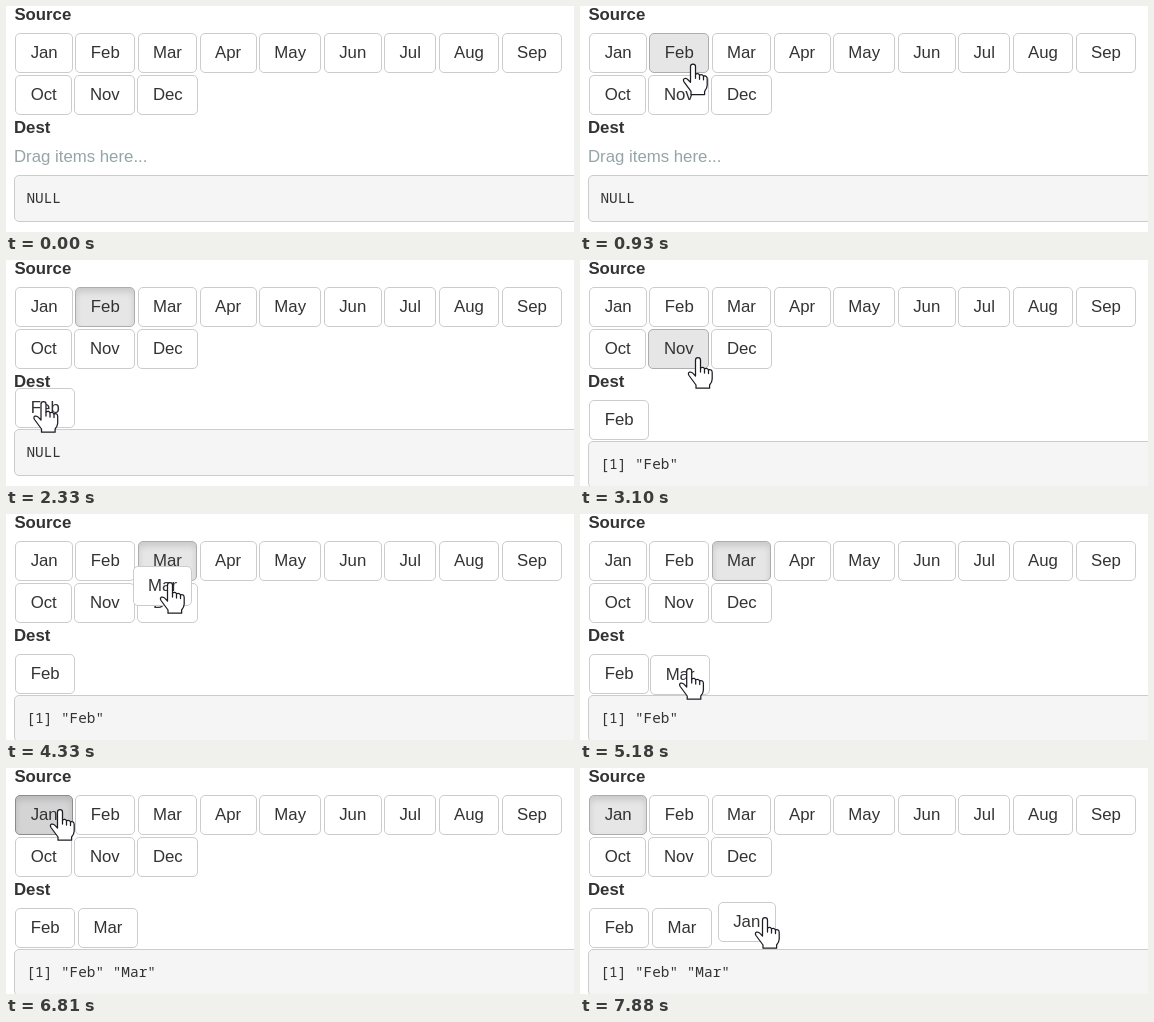
Recreate the animation shown at these times as an HTML page. Size 568 by 226 pixels, loop 8000 ms.

```html
<!DOCTYPE html>
<html lang="en">
<head>
<meta charset="utf-8">
<title>Drag months</title>
<style>
html, body { margin: 0; width: 568px; height: 226px; overflow: hidden; background: #fff; }
body { position: relative; color: #333; font: 16.8px/19px "Liberation Sans", Arial, sans-serif; }
body > * { position: absolute; margin: 0; white-space: pre; box-sizing: border-box; }
.row { display: flex; flex-wrap: wrap; left: 9.2px; width: 552px; }
#source { top: 27px; gap: 2px 2.3px; }
#dest { top: 140px; gap: 3px; }
.btn { box-sizing: border-box; height: 40px; padding: 0 14.45px; border: 1px solid #ccc; border-radius: 5px; background: #fff; line-height: 37px; }
.hover, .active { background: #e6e6e6; border-color: #adadad; }
.active { box-shadow: inset 0 4px 6px rgba(0, 0, 0, .125); }
.pressed { background: #d4d4d4; border-color: #8c8c8c; }
#hint { left: 8px; top: 141px; color: #95a5a6; }
#out { left: 8px; width: 580px; height: 47px; padding: 12px 11.4px; border: 1px solid #ccc; border-radius: 5px;
  background: #f5f5f5; font: 14.4px/19px "Noto Sans Mono", monospace; }
#hand { left: 0; top: -1.5px; overflow: visible; fill: #fff; stroke: #1c1c26; stroke-width: 1.25; stroke-linejoin: round; stroke-linecap: round; }
</style>
</head>
<body>
<b style="left:8.4px;top:-1px">Source</b>
<b style="left:8px;top:112px">Dest</b>
<div id="source" class="row"></div>
<div id="hint">Drag items here...</div>
<pre id="out"></pre>
<div id="dest" class="row"></div>
<div id="ghost" class="btn"></div>
<svg id="hand" width="1" height="1">
  <path d="M-2.5 3a2.5 2.3 0 0 1 5 0V11q2.6-1.6 4 .8 2.6-1.2 4 1 3.6-.8 3.7 2.7V22q0 3-2.6 6V31.2H-2V28L-9 18.5q-1.4-2.6.5-3.3 2-.6 3.5 1.2L-2.5 19Z"/>
  <path fill="none" d="M2.5 11v4M6.5 12v4M10.5 13v3.5"/>
</svg>
<script>
const LOOP = 8000, STEP = 77, LAG = .4;
const $ = id => document.getElementById(id);
const hint = $('hint'), out = $('out'), ghost = $('ghost'), hand = $('hand');

function button(name, parent) {
  const el = document.createElement('div');
  el.className = 'btn';
  el.textContent = name;
  return parent.appendChild(el);
}
const source = 'Jan Feb Mar Apr May Jun Jul Aug Sep Oct Nov Dec'.split(' ').map(m => button(m, $('source')));

// Each pointer trip sets out from where the last one ended; path points are [step, x, y]
const trips = [
  { start: 610, path: [[0, 232, 188], [2, 145, 95], [5, 97, 40]] },
  { start: 1410, drag: 'Feb', path: [[3, 95, 67], [10, 42, 137], [14, 33, 147]] },
  { start: 2880, path: [[3, 118, 98], [10, 172, 42], [12, 168, 40]] },
  { start: 4100, drag: 'Mar', path: [[3, 164, 69], [7, 49, 133], [10, 98, 147], [15, 112, 157]] },
  { start: 5640, path: [[2, 124, 192], [5, 139, 66], [10, 66, 49], [13, 54, 42]] },
  { start: 6810, drag: 'Jan', path: [[7, 130, 146], [10, 175, 138], [14, 185, 150]] }
];
trips.forEach((trip, i) => {
  const [, x, y] = i ? trips[i - 1].path.at(-1) : trip.path[0];
  trip.path.unshift([0, x, y]);
  trip.end = trips[i + 1]?.start ?? LOOP;
  if (trip.drag) {
    trip.item = source.find(el => el.textContent === trip.drag);
    trip.dropped = button(trip.drag, $('dest'));
  }
});
const drags = trips.filter(trip => trip.drag);

function pose(path, step) {
  const n = path.findIndex(p => p[0] > step);
  if (n < 0) return path.at(-1).slice(1);
  const [s0, x0, y0] = path[n - 1], [s1, x1, y1] = path[n];
  const k = (step - s0) / (s1 - s0);
  return [x0 + (x1 - x0) * k, y0 + (y1 - y0) * k];
}

function contains(el, [x, y]) {
  const r = el.getBoundingClientRect();
  return x >= r.left && x < r.right && y >= r.top && y < r.bottom;
}
function show(el, on) { el.style.display = on ? '' : 'none'; }

function draw(t) {
  const trip = trips.findLast(trip => t >= trip.start);
  const step = trip ? Math.floor((t - trip.start) / STEP + .2) : 0;
  const tip = trip ? pose(trip.path, step) : [-99, -99];
  const held = trip?.item;
  const carried = held && step > 0;

  const done = drags.filter(d => t >= d.end);
  for (const d of drags) show(d.dropped, done.includes(d));
  for (const el of [...source, ...done.map(d => d.dropped)]) {
    const look = el === held ? (carried ? 'active' : 'active pressed')
      : !held && contains(el, tip) ? 'hover' : '';
    el.className = 'btn ' + look;
  }

  show(ghost, carried);
  if (carried) {
    // the carried copy trails slightly behind the pointer
    const [x, y] = pose(trip.path, Math.min(step, trip.path.at(-1)[0]) - LAG);
    const [, x0, y0] = trip.path[0];
    const from = held.getBoundingClientRect();
    ghost.textContent = trip.drag;
    ghost.style.left = from.left + x - x0 - 1.4 + 'px';
    ghost.style.top = from.top + y - y0 + 'px';
  }

  show(hint, t < 2250);
  out.style.top = (done.length ? 181 : 169) + 'px';
  out.textContent = done.length ? '[1] ' + done.map(d => `"${d.drag}"`).join(' ') : 'NULL';
  show(hand, trip);
  hand.style.transform = `translate(${tip[0]}px, ${tip[1]}px)`;
}

const t0 = performance.now();
function tick() {
  draw((performance.now() - t0) % LOOP);
  requestAnimationFrame(tick);
}
tick();
</script>
</body>
</html>
```
